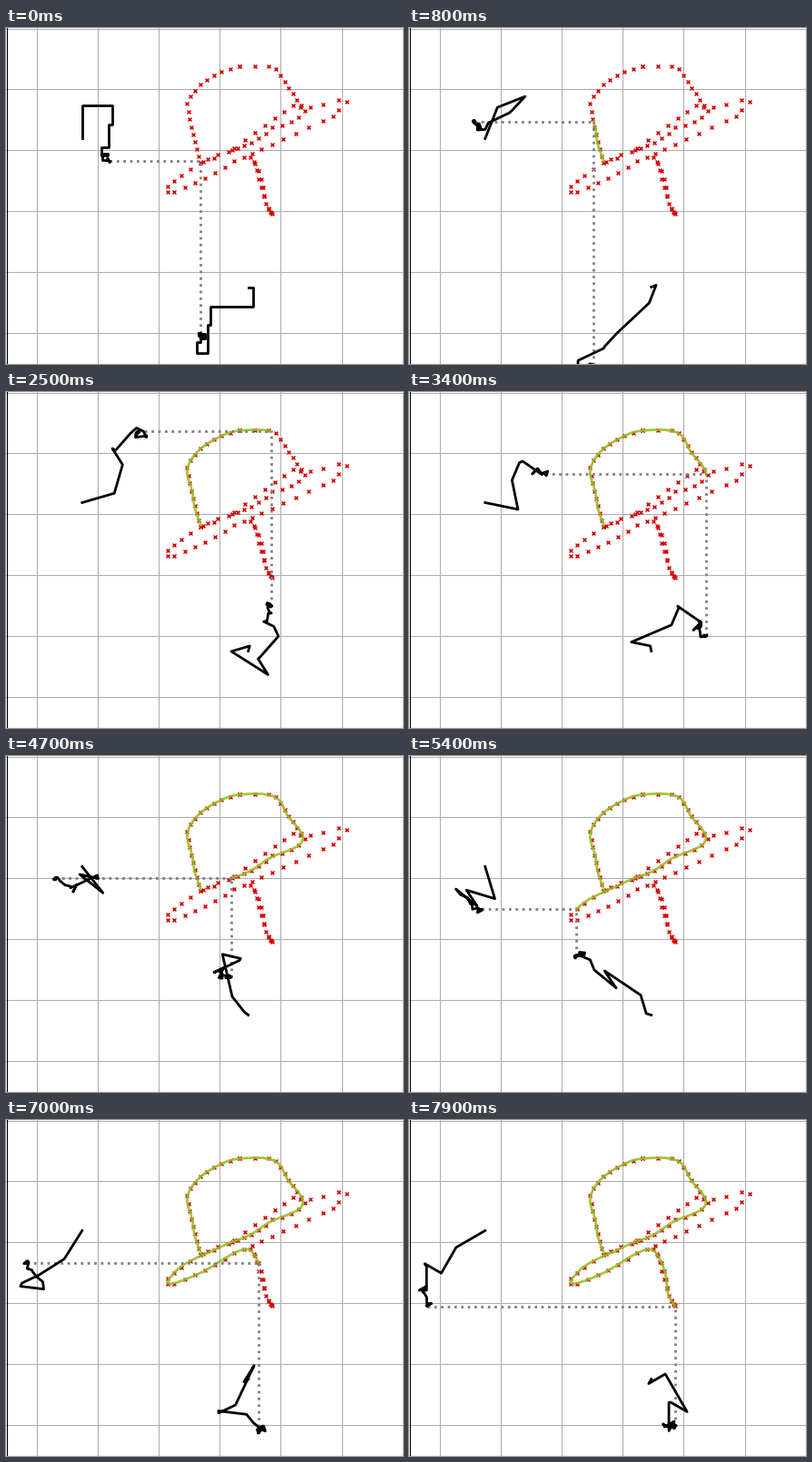
A matplotlib script that plays this animation: 437 by 369 pixels, repeating every 8000 ms.

```python
import numpy as np
import matplotlib.pyplot as plt
from matplotlib.animation import FuncAnimation

W, H, DPI = 437, 369, 100
FRAMES, INTERVAL = 80, 100
STEPS_PER_TURN = 117
HARMONICS = 20
CELL = 67.2
BOTTOM_Y, LEFT_X = 284.5, 83.8
GRAY = "#b0b0b0"

# The hat is a chain of parabolas: (halfway point, end point, steps).
START = (214, 148)
DOME = [((206, 117), (199, 83), 8), ((221, 57), (257, 42), 8),
        ((257, 42), (274, 42), 2), ((289, 42), (297, 45), 2),
        ((313.5, 69), (329, 91), 7)]
BRIM = [((314, 103), (293, 109), 4), ((278, 121), (262, 129), 4),
        ((251.5, 133), (245, 136), 3), ((229, 143), (214, 148), 2),
        ((193, 162), (178, 174), 4), ((178, 180), (185, 180), 2),
        ((219, 165), (251, 146), 6), ((262, 142), (269, 142), 2)]
STEM = [((278, 157), (283, 175), 4), ((286, 193), (292, 203), 4),
        ((293, 204), (291, 202), 2), ((289, 198), (284, 184), 2),
        ((277, 161), (271, 138), 5)]
PEAK = [((305, 122), (349, 102), 6), ((360, 97), (366, 90), 2),
        ((375, 81), (366, 79), 2), ((335, 87), (316, 85), 4),
        ((285, 107), (251, 132), 6), ((227, 142), (217, 147), 3)]


def sketch(start, arcs):
    pts = [np.array([start], float)]
    for mid, end, n in arcs:
        t = np.arange(1, n + 1)[:, None] / n
        pts.append((1 - t) * (1 - 2 * t) * pts[-1][-1]
                   + 4 * t * (1 - t) * np.array(mid)
                   + t * (2 * t - 1) * np.array(end))
    return np.vstack(pts)


def series(values):
    """Mean, cosine and sine coefficients of a closed signal."""
    c = np.fft.rfft(values) / len(values)
    return c[0].real, 2 * c[1:HARMONICS + 1].real, -2 * c[1:HARMONICS + 1].imag


def chain(coefs, across0, theta):
    """Joints of an arm whose tip follows the signal along its first axis."""
    mean, a, b = coefs
    kt = np.arange(1, HARMONICS + 1) * theta
    cos, sin = np.cos(kt), np.sin(kt)
    along = np.column_stack((a * cos, b * sin)).ravel()
    across = np.column_stack((-a * sin, -b * cos)).ravel()
    return mean + np.r_[0, along.cumsum()], across0 + np.r_[0, across.cumsum()]


points = sketch(START, DOME + BRIM + STEM + PEAK)
cx, cy = series(points[:, 0]), series(points[:, 1])


def arms(step):
    theta = 2 * np.pi * step / STEPS_PER_TURN
    bottom = chain(cx, BOTTOM_Y, theta)
    left = chain(cy, LEFT_X, theta)[::-1]
    return bottom, left


def tip(step):
    bottom, left = arms(step)
    return bottom[0][-1], left[1][-1]


path = np.array([tip(s) for s in range(FRAMES)])

fig = plt.figure(figsize=(W / DPI, H / DPI), dpi=DPI, facecolor="white")
ax = fig.add_axes([0, 0, 1, 1])
ax.set_xlim(0, W)
ax.set_ylim(H, 0)
ax.axis("off")

for i in range(6):
    ax.axvline(33.5 + i * CELL, color=GRAY, lw=0.8, zorder=0.5)
for i in range(5):
    ax.axhline(66.5 + i * CELL, color=GRAY, lw=0.8, zorder=0.5)
ax.axhline(0.5, color=GRAY, lw=0.8, zorder=0.5)
for x in (0.5, W - 0.5):
    ax.axvline(x, color="black", lw=0.8, zorder=0.6)
ax.axhline(H - 0.5, color="black", lw=0.8, zorder=0.6)

ax.scatter(*points.T, s=8, marker="x", color="#d80000", linewidths=1.1,
           zorder=1)
trace, = ax.plot([], [], color="#96be25", alpha=0.87, lw=2, zorder=2)
guides = [ax.plot([], [], ":", color="gray", lw=2, zorder=3)[0]
          for _ in range(2)]
limbs = [ax.plot([], [], color="black", lw=2, zorder=4)[0] for _ in range(2)]


def draw(frame):
    step = max(frame - 1, 0)  # the opening pose is held for two frames
    pen = path[step]
    trace.set_data(*path[:step + 1].T)
    for limb, guide, (u, v) in zip(limbs, guides, arms(step)):
        limb.set_data(u, v)
        guide.set_data([u[-1], pen[0]], [v[-1], pen[1]])
    return [trace, *guides, *limbs]


anim = FuncAnimation(fig, draw, frames=FRAMES, interval=INTERVAL,
                     init_func=lambda: draw(0), repeat=True, repeat_delay=0,
                     blit=False)
plt.show()
```
